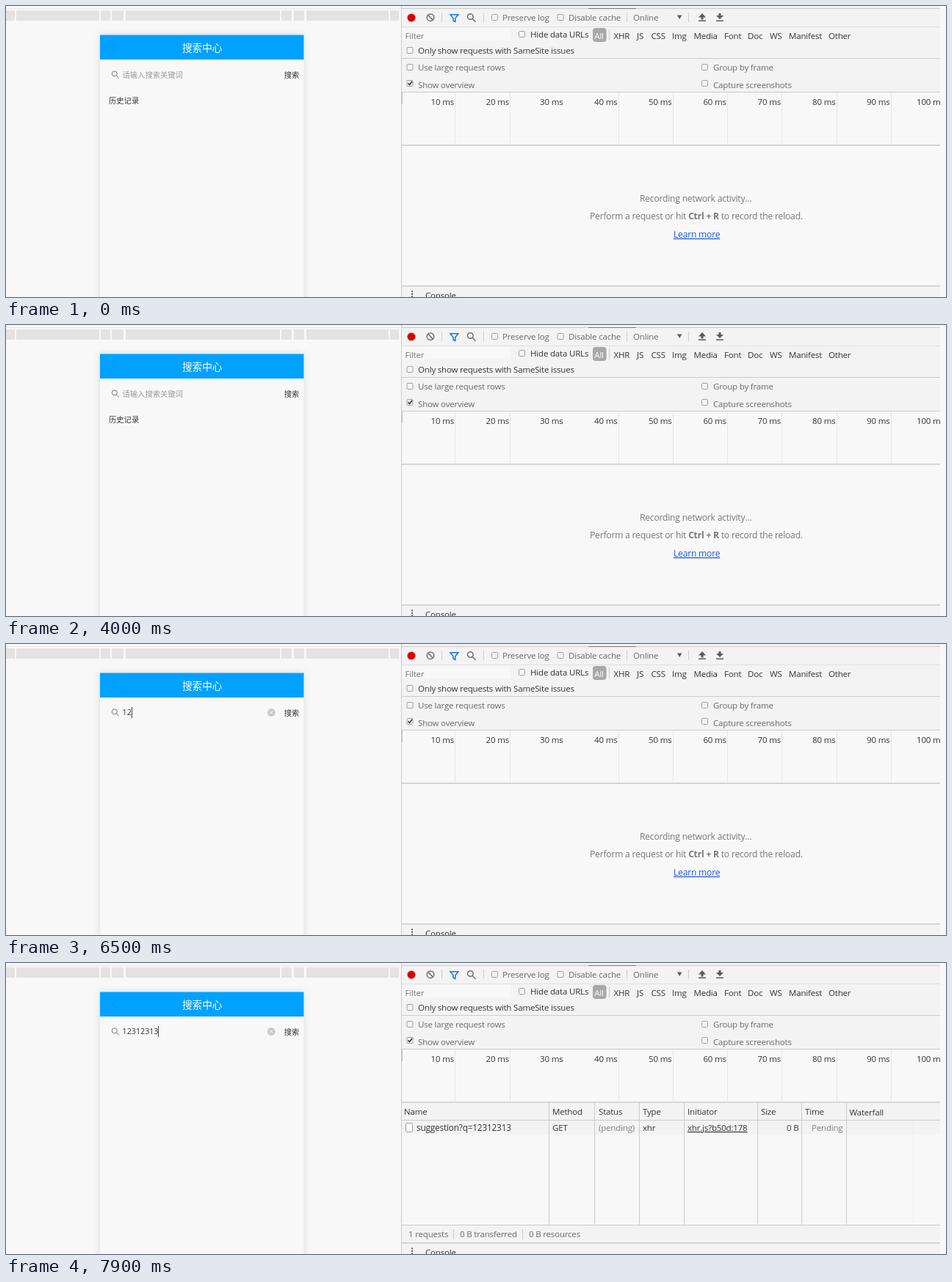
An HTML page for the animation above (8 s loop, 1280 by 397 pixels).

```html
<!DOCTYPE html>
<html lang="zh">
<head>
<meta charset="utf-8">
<title>Search and network panel</title>
<style>
  html, body { margin: 0; width: 100%; height: 100%; overflow: hidden; background: #f8f8f8; }
  svg { position: absolute; left: 0; top: 0; display: block; }
  text { font: 11.5px "Open Sans", "Noto Sans", sans-serif; letter-spacing: -.18px; fill: #333; white-space: pre; }
  .soft text, text.soft { fill: #6a6a6a; }
  .dim { fill: #808080; }
  .end text, text.end { text-anchor: end; }
  .msg text { font-size: 12.05px; fill: #777; }
  .msg .link { fill: #1a56db; text-decoration: underline; }
  .cjk text { font: 10.3px "Noto Sans CJK SC", "Noto Sans CJK", sans-serif; letter-spacing: 0; }
  .cjk .title { font-size: 13.6px; font-weight: 500; fill: #fff; }
  .cjk .hint { fill: #999; }
  .phone { fill: #f8f8f8; filter: drop-shadow(0 0 5px rgba(0, 0, 0, .13)); }
  .bar { fill: #f3f3f3; }
  .rule { stroke: #ccc; fill: none; }
  .grid { stroke: #e6e6e6; fill: none; }
  .icon { stroke: #6e6e6e; fill: none; stroke-width: 1.5; }

  #input {
    position: absolute; left: 158.6px; top: 86px; height: 15px; overflow: hidden; width: 0;
    font: 10.7px/15px "Open Sans", "Noto Sans", sans-serif; color: #333; white-space: nowrap;
    border-right: 1px solid transparent;
  }
  #input, .empty, .typed, .idle, .sent, .hover {
    animation: 8s step-end infinite;
  }
  #input { animation-name: type, blink; }
  .empty { animation-name: before-typing; }
  .typed { animation-name: after-typing; }
  .idle { animation-name: before-request; }
  .sent { animation-name: after-request; }
  .soft .hover { animation-name: hover; }

  @keyframes type {
    0% { width: 0; }
    81.25% { width: 2ch; }
    82.5% { width: 3ch; }
    83.75% { width: 4ch; }
    85% { width: 5ch; }
    86.25% { width: 6ch; }
    87.5%, 100% { width: 8ch; }
  }
  @keyframes blink {
    0%, 38.75%, 50%, 61.25%, 72.5%, 93.75% { border-color: transparent; }
    32.5%, 43.75%, 55%, 66.25%, 78.75%, 98.75%, 100% { border-color: #444; }
  }
  @keyframes before-typing { 0% { visibility: visible; } 81.25%, 100% { visibility: hidden; } }
  @keyframes after-typing { 0% { visibility: hidden; } 81.25%, 100% { visibility: visible; } }
  @keyframes before-request { 0% { visibility: visible; } 98.75%, 100% { visibility: hidden; } }
  @keyframes after-request { 0% { visibility: hidden; } 98.75%, 100% { visibility: visible; } }
  @keyframes hover { 0%, 6.25%, 100% { fill: #6a6a6a; } 5% { fill: #333; } }
</style>
</head>
<body>
<svg width="1280" height="397" viewBox="0 0 1280 397">
  <defs>
    <rect id="box" x=".5" y=".5" width="8" height="8" rx="1" fill="#f4f4f4" stroke="#a0a0a0"/>
    <clipPath id="panel"><path d="M538 0H1272V397H538z"/></clipPath>
  </defs>
  <rect width="1280" height="397" fill="#f8f8f8"/>

  <!-- Device ruler -->
  <path fill="#e3e3e3" d="M0 6h12v14H0zM14 6h113v14H14zM129 6h13v14h-13zM144 6h16v14h-16zM163 6h210v14H163zM375 6h14v14h-14zM392 6h14v14h-14zM409 6h112v14H409zM523 6h12v14h-12z"/>
  <path d="M0 3.5H538" stroke="#eaeaea"/>

  <!-- Phone -->
  <g class="cjk">
    <rect class="phone" x="128" y="39.5" width="277.5" height="380"/>
    <rect x="128" y="39.5" width="277.5" height="33.5" fill="#01a1ff"/>
    <path d="M149 53l-4 4 4 4" fill="none" stroke="#1287d2" stroke-width=".8"/>
    <text class="title" x="240" y="62">搜索中心</text>
    <g fill="none" stroke="#666" stroke-width=".9"><circle cx="147.8" cy="92.4" r="3.5"/><path d="M150.4 95l3.4 3.4"/></g>
    <text x="378.8" y="97.6">搜索</text>
    <g class="empty">
      <text class="hint" x="158.5" y="97.6">请输入搜索关键词</text>
      <text x="140" y="133">历史记录</text>
    </g>
    <g class="typed">
      <circle cx="361.3" cy="93.5" r="5.4" fill="#c8c9cc"/>
      <path d="M359.4 91.6l3.8 3.8m0-3.8l-3.8 3.8" stroke="#fff" stroke-width=".9"/>
    </g>
  </g>

  <!-- Network panel -->
  <g clip-path="url(#panel)">
    <path class="bar" d="M538 0H1272V118H538zM538 383H1272V397H538z"/>
    <path class="rule" d="M538 3.5H1272M538 71.5H1272M538 117.5H1272"/>
    <path d="M538 28.5H1272" stroke="#e0e0e0"/>
    <path d="M793 3.5h65" stroke="#777"/>
    <path class="rule" d="M593.5 9v13M650.5 9v13M845.5 9v13M929.5 9v13M821.5 32v15"/>

    <circle cx="552" cy="16" r="6.2" fill="#f3b9b9"/>
    <circle cx="552" cy="16" r="5.3" fill="#d90000"/>
    <g class="icon">
      <circle cx="578" cy="15.7" r="4.8"/><path d="M574.6 12.3l6.8 6.8"/>
      <circle cx="632.3" cy="14.5" r="3.8"/><path d="M635 17.2l4.5 4.5"/>
    </g>
    <path d="M605 11.7h10.8l-4 5v4.8l-2.8-1.5v-3.3z" fill="none" stroke="#1a73e8" stroke-width="1.5"/>
    <path fill="#5a5a5a" d="M914 12.5h6.4l-3.2 5.5zM948 10l5 5.5h-3.5v3h-3v-3H943zM943 19.5h10v1.5h-10zM972 18l-5-5h3.5v-3h3v3h3.5zM967 19.5h10v1.5h-10z"/>
    <use href="#box" x="661" y="11"/><use href="#box" x="750.5" y="11"/>
    <g class="soft">
      <text x="676" y="20.3">Preserve log</text>
      <text x="766" y="20.3">Disable cache</text>
      <text x="854" y="20.3">Online</text>
    </g>

    <rect x="539" y="30" width="148" height="17" fill="#f8f8f8"/>
    <text class="dim" x="543.5" y="44.7" style="fill:#777">Filter</text>
    <use href="#box" x="698" y="34"/>
    <text x="714" y="43.4">Hide data URLs</text>
    <rect x="799" y="30" width="18.5" height="19" rx="4" fill="#a8a8a8"/>
    <text x="801.3" y="44.9" style="fill:#fff">All</text>
    <g id="types">
      <text x="827.5" y="44.9">XHR</text><text x="859" y="44.9">JS</text>
      <text x="878.5" y="44.9">CSS</text><text x="907" y="44.9">Img</text>
      <text x="936.5" y="44.9">Media</text><text x="978" y="44.9">Font</text>
      <text x="1010" y="44.9">Doc</text><text x="1040" y="44.9">WS</text>
      <text x="1066" y="44.9">Manifest</text><text x="1120" y="44.9">Other</text>
    </g>
    <use href="#box" x="545.5" y="56"/>
    <text x="561" y="65.2">Only show requests with SameSite issues</text>

    <use href="#box" x="545.5" y="79"/><use href="#box" x="947" y="79"/>
    <use href="#box" x="545.5" y="101"/><use href="#box" x="947" y="101"/>
    <path d="M547.5 105.3l2 2.2 3.6-4.8" fill="none" stroke="#333" stroke-width="1.5"/>
    <g class="soft">
      <text class="hover" x="561" y="88">Use large request rows</text>
      <text x="963" y="88">Group by frame</text>
      <text x="561" y="111.6">Show overview</text>
      <text x="963" y="111.6">Capture screenshots</text>
    </g>

    <!-- Timeline -->
    <path class="grid" d="M611.5 118V189M686.5 118V189M834.5 118V189M908.5 118V189M982.5 118V189M1056.5 118V189M1131.5 118V189M1205.5 118V189"/>
    <path d="M539 118v16" stroke="#888"/>
    <g class="end">
      <text x="610" y="135">10 ms</text><text x="685" y="135">20 ms</text>
      <text x="758.5" y="135">30 ms</text><text x="832.5" y="135">40 ms</text>
      <text x="906.5" y="135">50 ms</text><text x="980.8" y="135">60 ms</text>
      <text x="1055" y="135">70 ms</text><text x="1129.5" y="135">80 ms</text>
      <text x="1203.5" y="135">90 ms</text>
    </g>
    <text x="1240" y="135">100 ms</text>

    <g class="idle msg">
      <text x="863" y="267">Recording network activity…</text>
      <text x="795" y="291.4">Perform a request or hit <tspan font-weight="700">Ctrl + R</tspan> to record the reload.</text>
      <text class="link" x="909" y="316">Learn more</text>
    </g>

    <!-- Request table -->
    <g class="sent">
      <path class="bar" d="M539 191H1272V234H539zM539 358H1272V382H539z"/>
      <path class="grid" d="M1235.5 215V357" opacity=".5"/>
      <path class="rule" d="M538 214.5H1272M538 357.5H1272M739.5 191V357M801.5 191V357M862.5 191V357M923.5 191V357M1023.5 191V357M1083.5 191V357M1144.5 191V357M609.5 363v14M703.5 363v14"/>
      <text x="542" y="207">Name</text><text x="744" y="207">Method</text>
      <text x="807" y="207">Status</text><text x="867" y="207">Type</text>
      <text x="928" y="207">Initiator</text><text x="1028" y="207">Size</text>
      <text x="1088" y="207">Time</text><text x="1148.5" y="207.6">Waterfall</text>
      <rect x="544.5" y="218.5" width="9" height="12" rx="1" fill="#fff" stroke="#999"/>
      <text x="559" y="229" style="font-size:11.8px">suggestion?q=12312313</text>
      <text x="744" y="229">GET</text>
      <text class="dim" x="807" y="229" style="fill:#808080">(pending)</text>
      <text x="867" y="229">xhr</text>
      <text x="928" y="229" text-decoration="underline">xhr.js?b50d:178</text>
      <text class="end" x="1079.5" y="229">0 B</text>
      <text class="end" x="1139.5" y="229" style="fill:#808080">Pending</text>
      <g class="soft">
        <text x="548" y="374.3">1 requests</text>
        <text x="618" y="374.3">0 B transferred</text>
        <text x="712" y="374.3">0 B resources</text>
      </g>
    </g>

    <path class="rule" stroke-width="1.6" d="M538 190H1272M538 382H1272"/>
    <path fill="#5a5a5a" d="M552 388.5h2v2h-2zM552 392h2v2h-2zM552 395.5h2v2h-2z"/>
    <text x="571" y="399">Console</text>
    <path class="rule" d="M538.5 0V397"/>
  </g>
</svg>
<div id="input">12312313</div>
</body>
</html>
```
